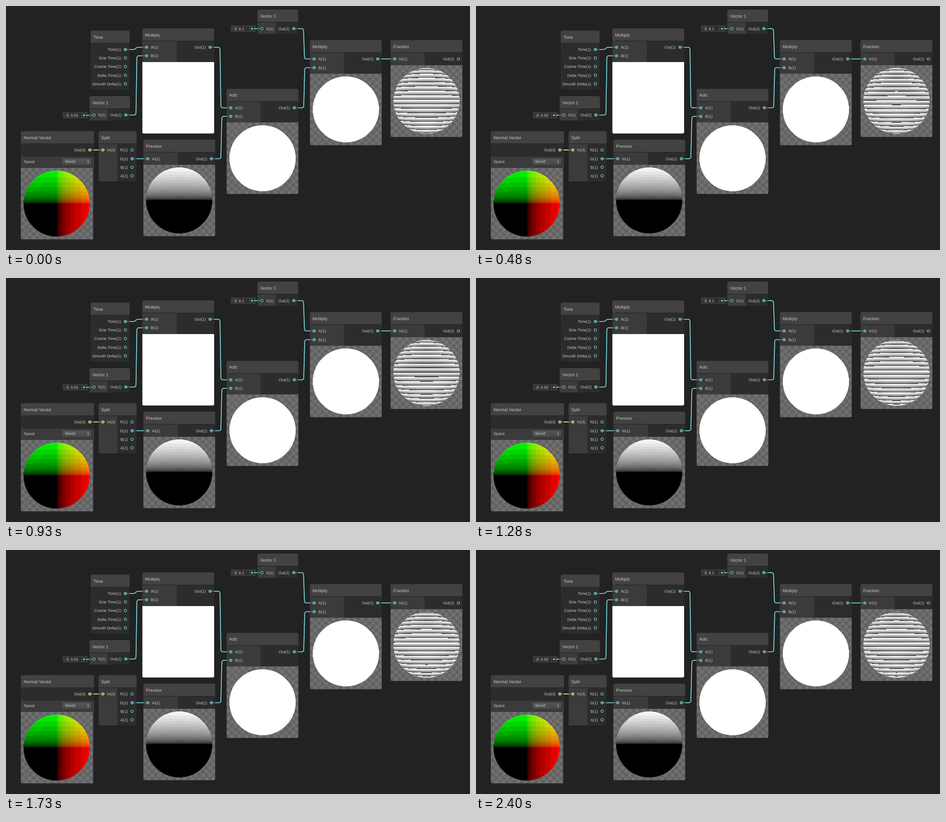
Write an HTML page with a canvas that moves like this. It is 1030 by 544 pixels and loops after 2.5 s.

```html
<!DOCTYPE html>
<html lang="en">
<head>
<meta charset="utf-8">
<title>Node graph</title>
<style>
  html, body { margin: 0; width: 100%; height: 100%; overflow: hidden; background: #222; }
  svg, canvas { position: absolute; left: 0; top: 0; display: block; }
  text { font: 8.8px "Liberation Sans", Arial, sans-serif; fill: #c9c9c9; text-rendering: geometricPrecision; }
  .title { font-size: 9.75px; fill: #c6c6c6; }
  .end { text-anchor: end; }
  .wire { fill: none; stroke-width: 1.6; }
</style>
</head>
<body>
<svg id="graph" width="1030" height="544" viewBox="0 0 1030 544"></svg>
<canvas id="spheres" width="1030" height="544"></canvas>
<script>
const CYAN = '#84e4e7', YELLOW = '#f2f79a';
const HEADER = '#424242', INPUT = '#3b3b3b', OUTPUT = '#2c2c2c';

// Ports are [label, x, y, connected, colour].
const nodes = [
  { title: 'Time', x: 188, y: 55, w: 86.5, h: 131,
    outs: [['Time(1)', 265, 97, 1], ['Sine Time(1)', 265, 116], ['Cosine Time(1)', 265, 135],
           ['Delta Time(1)', 265, 154.5], ['Smooth Delta(1)', 265, 173.5]] },
  { title: 'Vector 1', x: 185.5, y: 201, w: 89.5, h: 54.5, split: 226,
    ins: [['X(1)', 195, 243]], outs: [['Out(1)', 266, 243, 1]] },
  { title: 'Multiply', x: 302.5, y: 50, w: 159.5, h: 234.5, split: 379, view: 125, fill: '#fff',
    ins: [['A(1)', 312, 92, 1], ['B(1)', 312, 111, 1]], outs: [['Out(1)', 453, 92, 1]] },
  { title: 'Normal Vector', x: 33, y: 279, w: 162.5, h: 241.5, view: 361, viewWidth: 160,
    outs: [['Out(3)', 186, 321, 1, YELLOW]] },
  { title: 'Split', x: 205.5, y: 279, w: 84.5, h: 112.5, split: 247.5,
    ins: [['In(3)', 215, 321, 1, YELLOW]],
    outs: [['R(1)', 280, 321], ['G(1)', 280, 340.5, 1], ['B(1)', 280, 359.5], ['A(1)', 280, 378.5]] },
  { title: 'Preview', x: 305, y: 298, w: 159.5, h: 215.5, split: 381.5, view: 354,
    ins: [['In(1)', 314.5, 340.5, 1]], outs: [['Out(1)', 456, 340.5, 1]] },
  { title: 'Add', x: 489.5, y: 184.5, w: 159.5, h: 234.5, split: 565.5, view: 259.5,
    ins: [['A(1)', 499, 227, 1], ['B(1)', 499, 246, 1]], outs: [['Out(1)', 640, 227, 1]] },
  { title: 'Vector 1', x: 558, y: 8, w: 90.5, h: 54.5, split: 599,
    ins: [['X(1)', 568, 50.5]], outs: [['Out(1)', 639, 50.5, 1]] },
  { title: 'Multiply', x: 674.5, y: 76, w: 159.5, h: 234.5, split: 750.5, view: 151,
    ins: [['A(1)', 684, 118, 1], ['B(1)', 684, 137.5, 1]], outs: [['Out(1)', 825, 118, 1]] },
  { title: 'Fraction', x: 853.5, y: 76, w: 159.5, h: 216, split: 929.5, view: 132,
    ins: [['In(1)', 863, 118, 1]], outs: [['Out(1)', 1004.5, 118]] }
];

// A wire with rounded corners and a slightly leaning run around x = mid.
function bend(x1, y1, mid, x2, y2) {
  const r = 5, s = Math.sign(y2 - y1) * r, a = mid - 1, b = mid + 1;
  return `M${x1} ${y1}H${a - r}Q${a} ${y1} ${a} ${y1 + s}L${b} ${y2 - s}Q${b} ${y2} ${b + r} ${y2}H${x2}`;
}
const wires = [
  ['M265 97H283Q286 97 288 94.5Q290 92 294 92H312'],
  [bend(266, 243, 289.5, 312, 111)],
  [bend(453, 92, 476, 499, 227)],
  [bend(456, 340.5, 478, 499, 246)],
  [bend(640, 227, 662, 684, 137.5)],
  [bend(639, 50.5, 661.5, 684, 118)],
  ['M825 118H863'], ['M280 340.5H314'], ['M186 321H215', YELLOW]
];

const rect = (x, y, w, h, fill, more = '') =>
  `<rect x="${x}" y="${y}" width="${w}" height="${h}" fill="${fill}" ${more}/>`;
const text = (s, x, y, cls = '') => `<text x="${x}" y="${y}" class="${cls}">${s}</text>`;
const dot = (x, y, r, fill, more = '') => `<circle cx="${x}" cy="${y}" r="${r}" fill="${fill}" ${more}/>`;
const drawWires = opacity => `<g opacity="${opacity}">` + wires.map(([d, colour = CYAN]) =>
  `<path class="wire" d="${d}" stroke="${colour}"/>`).join('') + '</g>';

function drawPort([label, x, y, on, colour = CYAN], isOutput) {
  return text(label, x + (isOutput ? -9.5 : 9.5), y + 3.2, isOutput ? 'end' : '') +
    dot(x, y, 2.8, '#222', `stroke="${colour}" stroke-width="1.05"`) + (on ? dot(x, y, 1.4, colour) : '');
}

function drawNode(n, i) {
  const { x, y, w, h } = n, bottom = n.view || y + h, width = n.viewWidth || w;
  let out = `<clipPath id="c${i}">${rect(x, y, w, h, '#000', 'rx="4"')}</clipPath><g clip-path="url(#c${i})">`;
  out += rect(x, y, w, h, OUTPUT) + rect(x, y, w, 27.5, HEADER);
  if (n.split) out += rect(x, y + 28, n.split - x, bottom - y - 28, INPUT);
  out += rect(x, y + 27.5, w, 1, '#252525');
  if (n.title === 'Normal Vector') out += rect(x, 335, w, 26, INPUT) + rect(x, 334.5, w, 1, '#252525');
  if (n.view) out += `<g transform="translate(${x} ${n.view})">` +
    rect(0, 0, width, y + h - n.view, n.fill || 'url(#checker)') + '</g>';
  return out + '</g>' + text(n.title, x + 6, y + 17.5, 'title');
}

function drawField(x, y, value, edge) {
  const cy = y + 7.5;
  return rect(x, y, 55.5, 15, '#393939', 'rx="1.5"') + rect(x + 15, y + 2, 25, 11, '#2f2f2f') +
    text('X', x + 8, y + 11) + text(value, x + 17.5, y + 11) +
    `<path class="wire" d="M${x + 51} ${cy}H${edge}" stroke="${CYAN}" stroke-width="1.2"/>` +
    `<path class="wire" d="M${edge} ${cy}h6" stroke="${CYAN}" opacity=".4"/>` +
    dot(x + 47, cy, 3.4, '#222') + dot(x + 47, cy, 2, CYAN);
}

document.getElementById('graph').innerHTML =
  `<defs><pattern id="checker" width="16" height="16" patternUnits="userSpaceOnUse">
    ${rect(0, 0, 16, 16, '#626262')}${rect(0, 0, 8, 8, '#707070')}${rect(8, 8, 8, 8, '#707070')}
  </pattern><linearGradient id="button" x2="0" y2="1">
    <stop stop-color="#575757"/><stop offset="1" stop-color="#464646"/>
  </linearGradient></defs>` +
  drawWires(1) + nodes.map(drawNode).join('') + drawWires(.4) +
  drawField(126, 236, '0.55', 185.5) + drawField(499, 43, '8.1', 558) +
  nodes.map(n => (n.ins || []).map(p => drawPort(p)).join('') +
    n.outs.map(p => drawPort(p, true)).join('')).join('') +
  text('Space', 39, 350) +
  rect(126, 340.5, 62.5, 13, 'url(#button)', 'rx="2.5" stroke="#5c5c5c" stroke-width=".6"') +
  text('World', 131, 350) +
  '<path d="M180.5 346.5l1.7-2.5 1.7 2.5zM180.5 348l1.7 2.5 1.7-2.5z" fill="#bbb"/>';

const SIZE = 147, DISTANCE = 10;
const ctx = document.getElementById('spheres').getContext('2d');

// Visible surface normals of a unit sphere seen in perspective.
const normals = [];
const slope = 1 / Math.sqrt(DISTANCE * DISTANCE - 1);
for (let j = 0; j < SIZE; j++) {
  for (let i = 0; i < SIZE; i++) {
    const x = (i + .5) * 2 / SIZE - 1, y = 1 - (j + .5) * 2 / SIZE, d2 = x * x + y * y;
    if (d2 > 1) continue;
    const t = (DISTANCE - Math.sqrt(1 - d2)) / (1 + slope * slope * d2);
    normals.push({ at: (j * SIZE + i) * 4, x: x * slope * t, y: y * slope * t });
  }
}

// Linear light to sRGB, reduced to a number of even levels.
function tone(v, levels) {
  v = Math.min(1, Math.max(0, v));
  const s = v < .0031308 ? v * 12.92 : 1.055 * v ** (1 / 2.4) - .055;
  return Math.round(s * levels) / levels * 255;
}

// Only the sphere's own pixels are painted; the rest stays transparent.
function drawSphere(left, top, shade) {
  const image = ctx.createImageData(SIZE, SIZE);
  for (const n of normals) image.data.set([...shade(n), 255], n.at);
  ctx.putImageData(image, left, top);
}
const grey = (v, levels) => { const g = tone(v, levels); return [g, g, g]; };

drawSphere(39, 367, n => [tone(n.x, 10), tone(n.y, 12), 0]);
drawSphere(311, 360, n => grey(n.y, 20));
drawSphere(496, 266, () => [255, 255, 255]);
drawSphere(681, 157, () => [255, 255, 255]);

const LOOP = 2500;
const steps = [0, 90, 180, 280, 380, 480, 570, 660, 750, 840, 930, 1020, 1100, 1190, 1280,
  1370, 1460, 1550, 1640, 1730, 1820, 1910, 2000, 2090, 2180, 2400];
const start = performance.now();
let shown = -1;

function play() {
  const now = (performance.now() - start) % LOOP;
  const step = steps.filter(s => s <= now).pop();
  if (step !== shown) {
    shown = step;
    const phase = .76 + 8.1 * .55 * step / 1000;
    drawSphere(860, 138, n => {
      const v = 8.1 * n.y + phase;
      return grey(v - Math.floor(v), 20);
    });
  }
  requestAnimationFrame(play);
}
play();
</script>
</body>
</html>
```
